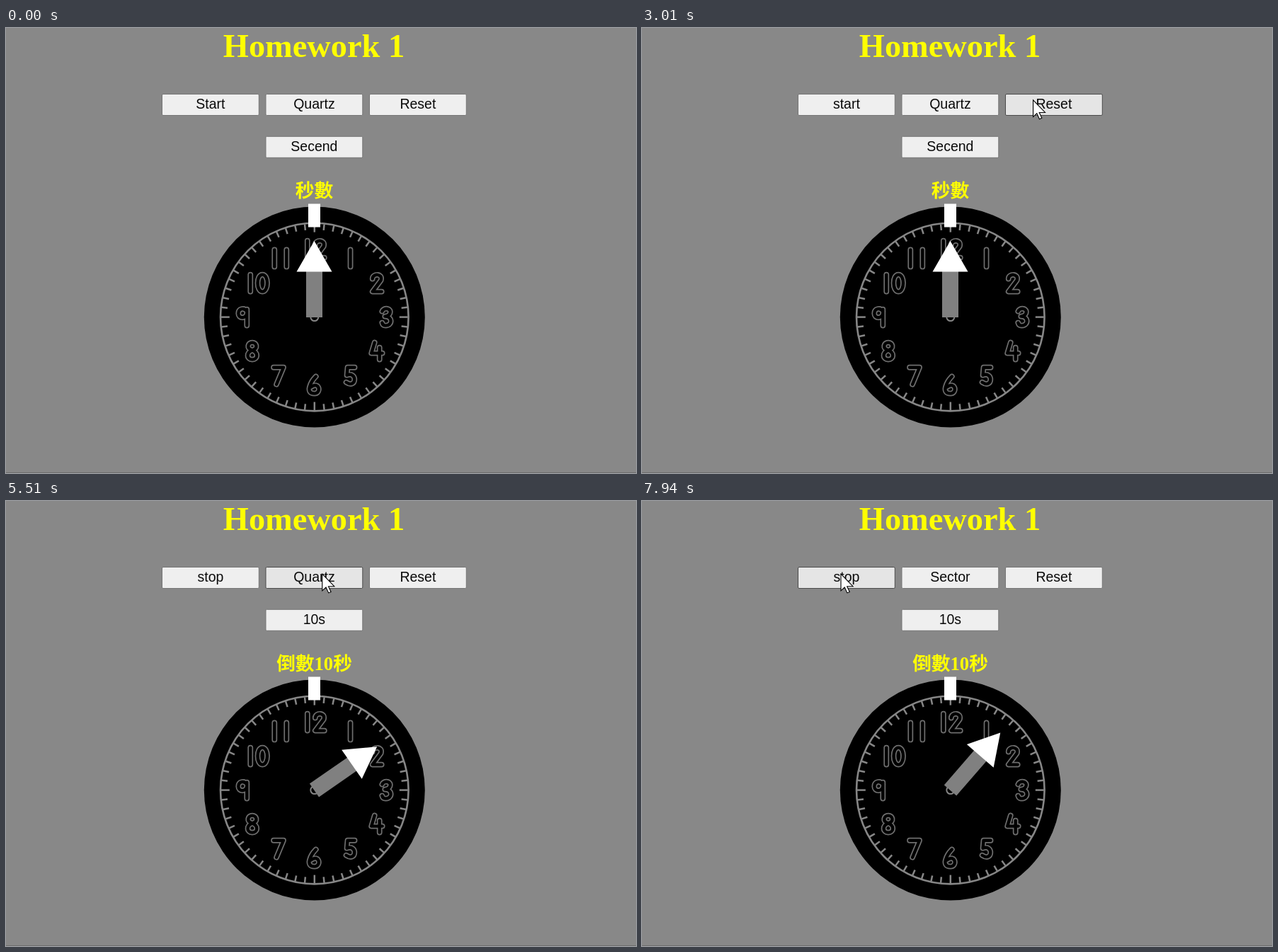
An HTML page for the animation above (8 s loop, 890 px wide and 629 px high).

```html
<!DOCTYPE html>
<html lang="zh-TW">
<head>
<meta charset="utf-8">
<title>Homework 1</title>
<style>
  html, body { margin: 0; width: 100%; height: 100%; overflow: hidden; background: #888; }
  svg { display: block; width: 890px; height: 629px; }
  text { text-anchor: middle; }
  .title, .label {
    font-family: "Liberation Serif", "Noto Sans CJK TC", "Noto Sans CJK HK", "Noto Sans CJK JP", "Noto Sans CJK", sans-serif;
    font-weight: 700; fill: #ff0;
  }
  .title { font-size: 46.4px; }
  .label { font-size: 26.7px; }
  .btn text { font: 19.5px "Liberation Sans", sans-serif; fill: #0a0a0a; }
  .btn rect { fill: #efefef; stroke: #767676; }
  .btn.hover rect { fill: #e5e5e5; stroke: #4a4a4a; }
  .dial { fill: none; stroke: #868686; }
  .digit path { fill: none; stroke-linecap: round; stroke-linejoin: round; }
  .rim { stroke: #6e6e6e; stroke-width: 7.8; }
  .core { stroke: #000; stroke-width: 4.4; }
</style>
</head>
<body>
<svg viewBox="0 0 890 629">
  <rect width="890" height="629" fill="#888"/>
  <rect y="628" width="890" height="1" fill="#6c6c6c"/>
  <text class="title" x="435" y="41">Homework 1</text>
  <g id="buttons"></g>
  <text class="label" id="label" x="435.5" y="239"></text>
  <g transform="translate(435.8 408.6)">
    <circle r="156"/>
    <circle class="dial" r="132.8" stroke-width="2.6"/>
    <g class="dial" id="ticks" stroke-width="2.5"></g>
    <g id="digits"></g>
    <circle class="dial" r="5.5" stroke-width="2"/>
  </g>
  <rect x="427" y="248.5" width="17" height="33" fill="#fff"/>
  <g id="hand">
    <rect x="424" y="343" width="23" height="66" fill="#808080"/>
    <path d="M435.5 301L460.5 344.5H410.5Z" fill="#fff"/>
  </g>
  <g id="pointer">
    <circle id="press" r="17.5" fill="#f3ea28" fill-opacity=".62"/>
    <path d="M0 0V23.8L5.2 19L8.9 26.9L12.3 25.4L8.7 17.7H17Z" fill="#fff" stroke="#000" stroke-width="1.1"/>
  </g>
</svg>
<script>
const LOOP = 8000, HOLD = 150, HOVER_LAG = 90;
const $ = id => document.getElementById(id);

// Buttons: three in a row, one below the middle
const W = 136.8, H = 30;
const makeButton = (col, row) => {
  const x = 220.5 + 146.5 * col, y = 93.5 + 59.8 * row;
  $('buttons').insertAdjacentHTML('beforeend',
    `<g class="btn"><rect x="${x}" y="${y}" width="${W}" height="${H}" rx="1.5"/>
     <text x="${x + W / 2}" y="${y + 20.4}"></text></g>`);
  const g = $('buttons').lastElementChild;
  return { x, y, g, text: g.querySelector('text') };
};
const buttons = {
  start: makeButton(0, 0), mode: makeButton(1, 0),
  reset: makeButton(2, 0), second: makeButton(1, 1)
};

// Dial
for (let i = 0; i < 60; i++) {
  $('ticks').innerHTML += `<path d="M0-132V${i % 15 ? -123.5 : -120}" transform="rotate(${i * 6})"/>`;
}

const strokes = [
  'M0-12C9-12 9 12 0 12S-9-12 0-12',
  'M0-12V12',
  'M-6-6C-6-14 9-14 6-4L-6 12H7',
  'M-6-8C-4-14 8-13 5-5Q3-1-2-1C9-1 9 12-1 12Q-5 12-6 8',
  'M-3-12L-7.5 3H8M4-5V12',
  'M6-12H-4L-5-1C10-7 9 19-6 9',
  'M2-12C-5-5-14 12 0 12C10 12 7-6-5 3',
  'M-7-12H7L-3 12',
  'M0-1C-9-4-6-12 0-12S9-4 0-1C-9 2-8 12 0 12S9 2 0-1',
  'M6-8C2-14-6-12-6-5S4 3 6-5M6-11V12'
];
for (let hour = 1; hour <= 12; hour++) {
  const a = hour * Math.PI / 6, wide = hour > 9;
  [...String(hour)].forEach((n, i) => {
    const x = (wide ? 93 : 101.5) * Math.sin(a) + (wide ? 17 * i - 10 : 0);
    const y = -96 * Math.cos(a);
    $('digits').innerHTML += `<g class="digit" transform="translate(${x} ${y})">
      <path class="rim" d="${strokes[n]}"/><path class="core" d="${strokes[n]}"/></g>`;
  });
}

// Where the pointer rests, from when to when
const stops = [
  { x: 666, y: 93, from: 790, to: 790 },
  { x: 470.5, y: 163.5, from: 1330, to: 2060 },
  { x: 553, y: 101.5, from: 2330, to: 2990 },
  { x: 454.5, y: 160.5, from: 3520, to: 4050 },
  { x: 292, y: 109.5, from: 4330, to: 5150 },
  { x: 446.8, y: 103, from: 5490, to: 5980 },
  { x: 288, y: 98.5, from: 6480, to: 6890 },
  { x: 496, y: 117, from: 7000, to: 7000 },
  { x: 446, y: 94.8, from: 7150, to: 7450 },
  { x: 281, y: 103, from: 7690, to: LOOP }
];
const presses = [1470, 1870, 2640, 3640, 4560, 6740, 7300, 7720];

function pointerAt(t) {
  const next = stops.findIndex(s => t <= s.to);
  const b = stops[next], a = stops[next - 1];
  if (!a) return t < b.from ? null : b;
  const p = Math.min(1, (t - a.to) / (b.from - a.to));
  const e = p * p * (3 - 2 * p);
  return { x: a.x + (b.x - a.x) * e, y: a.y + (b.y - a.y) * e };
}

const buttonAt = p => p && Object.keys(buttons).find(name => {
  const { x, y } = buttons[name];
  return p.x > x && p.x < x + W && p.y > y && p.y < y + H;
});

// Quartz sweeps, Sector jumps once a second
const turned = (s, t) => !s.running ? 0
  : s.sector ? 6 * (1 + Math.floor((t - s.since) / 1000))
  : 0.006 * (t - s.since);

const actions = {
  second(s) { s.secs += 10; s.angle = s.secs * 6; },
  reset(s) { s.secs = s.angle = 0; s.running = false; s.start = 'start'; },
  start(s) { s.running = !s.running; s.start = s.running ? 'stop' : 'start'; },
  mode(s) { s.sector = !s.sector; }
};

function stateAt(t) {
  const s = { secs: 0, angle: 0, running: false, sector: false, since: 0, start: 'Start' };
  for (const press of presses) {
    const when = press + HOLD;
    if (when > t) break;
    s.angle -= turned(s, when);
    s.since = when;
    actions[buttonAt(pointerAt(press))](s);
  }
  s.angle -= turned(s, t);
  return s;
}

function draw(t) {
  const s = stateAt(t);
  buttons.start.text.textContent = s.start;
  buttons.mode.text.textContent = s.sector ? 'Sector' : 'Quartz';
  buttons.reset.text.textContent = 'Reset';
  buttons.second.text.textContent = s.secs ? s.secs + 's' : 'Secend';
  $('label').textContent = s.secs ? `倒數${s.secs}秒` : '秒數';
  $('hand').setAttribute('transform', `rotate(${s.angle} 435.5 409)`);

  const over = buttonAt(pointerAt(t - HOVER_LAG));
  for (const name in buttons) buttons[name].g.classList.toggle('hover', name === over);

  const p = pointerAt(t);
  $('pointer').style.display = p ? '' : 'none';
  if (p) $('pointer').setAttribute('transform', `translate(${p.x} ${p.y})`);
  const down = presses.some(c => t >= c && t < c + HOLD);
  $('press').style.display = down ? '' : 'none';
}

const begin = performance.now();
function tick() {
  draw(Math.max(0, performance.now() - begin) % LOOP);
  requestAnimationFrame(tick);
}
tick();
</script>
</body>
</html>
```
